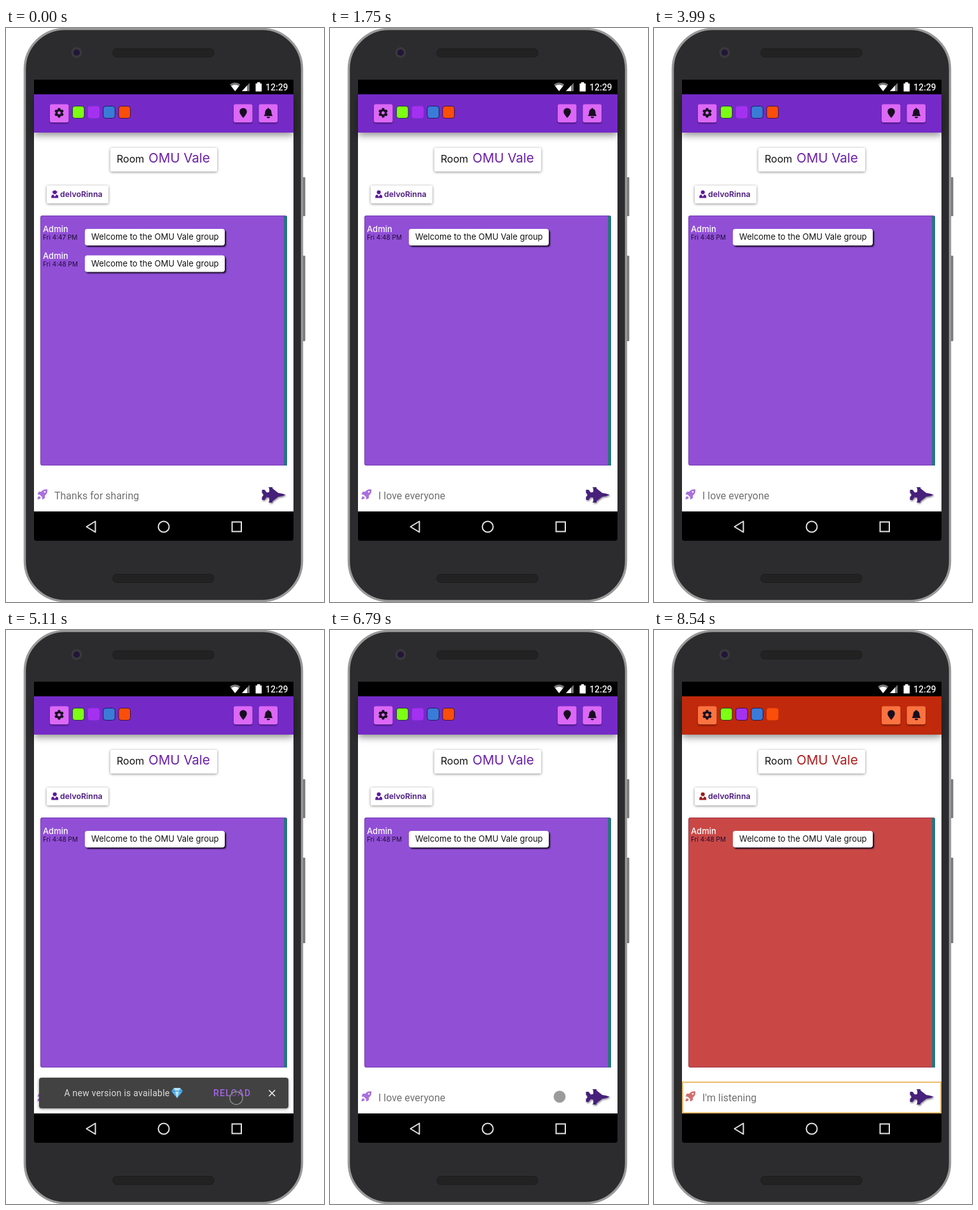
An HTML page that plays this animation: 500 by 900 pixels, repeating every 8.61 s.

```html
<!DOCTYPE html>
<html lang="en">
<head>
<meta charset="utf-8">
<title>Chat room on a phone</title>
<style>
  html, body { margin: 0; width: 100%; height: 100%; overflow: hidden; background: #fff; }
  svg { display: block; width: 500px; height: 900px; font-family: Inter, "Open Sans", sans-serif; }
  text { white-space: pre; }
  .ui { font-family: Roboto, "Noto Sans", sans-serif; }
  .lift { filter: drop-shadow(0 1px 2px rgba(0, 0, 0, .45)); }
  .bar { fill: var(--bar); filter: drop-shadow(0 4px 6px rgba(0, 0, 0, .45)); }
  .btn { fill: var(--btn); filter: drop-shadow(0 2px 1px rgba(0, 0, 0, .35)); }
  .body { fill: var(--body); }
  .bubble { fill: var(--body); filter: drop-shadow(2px 2px 1.2px #12081c); }
  .panel { fill: var(--panel); }
  .glyph { fill: #160d20; }
</style>
</head>
<body>
<svg id="stage" viewBox="0 0 500 900" xmlns="http://www.w3.org/2000/svg"></svg>
<script>
const LOOP = 8610, STEP = 70;
const GROUP = 'OMU Vale', USER = 'delvoRinna';

const themes = {
  purple: { bar: '#752ac8', btn: '#dc68f5', body: '#ffffff', panel: '#914fd6', name: '#6b1fa8', icon: '#5b1a99',
    rocket: '#a970de', sw0: '#7dff14', sw1: '#a431f0', sw2: '#3b7bd8', sw3: '#fa4e0a' },
  red: { bar: '#c0290b', btn: '#fa7340', body: '#ffffff', panel: '#c94846', name: '#b01c1c', icon: '#9c1c1c',
    rocket: '#d17070', sw0: '#7dff14', sw1: '#a431f0', sw2: '#3b7bd8', sw3: '#fa4e0a' },
  loading: { bar: '#918db6', btn: '#55dbf5', body: '#e7d9fc', panel: '#e7d9fc', name: '#6b1fa8', icon: '#1a1030',
    rocket: '#a96fe0', sw0: '#7fd84a', sw1: '#a42fe8', sw2: '#4070d0', sw3: '#db4545' }
};

const rect = (x, y, w, h, r, attrs = '') =>
  `<rect x="${x}" y="${y}" width="${w}" height="${h}" rx="${r}" ${attrs}/>`;
const label = (x, y, size, str, attrs = '') =>
  `<text x="${x}" y="${y}" font-size="${size}" ${attrs}>${str}</text>`;

const gear = () => {
  let teeth = '';
  for (let i = 0; i < 6; i++) teeth += rect(-2, -7.4, 4, 4, 1, `transform="rotate(${i * 60})"`);
  return `<g class="glyph" transform="translate(83.5 133)">${teeth}
    <circle r="4.1" fill="none" stroke="#160d20" stroke-width="3.2"/></g>`;
};

const swatches = () => [0, 1, 2, 3].map(i =>
  rect(104.5 + i * 24.2, 122.5, 18.5, 19, 4, `id="swatch${i}" fill="var(--sw${i})" stroke-width="1"`)).join('');

const message = (id, dy, time) => `<g id="${id}" transform="translate(0 ${dy})">
  <g class="fontText">
    ${label(58, 320, 13, 'Admin', 'fill="#fff" font-weight="500"')}
    ${label(58, 332, 10, time, 'fill="#1d0d33"')}
  </g>
  <rect class="bubble" id="${id}Bubble" y="315" height="26" rx="4"/>
  ${label(134, 332, 13, `Welcome to the ${GROUP} group`, 'class="fontText" fill="#111"')}
</g>`;

const phone = () => `
  ${rect(464, 234, 6.5, 61, 1, 'fill="#777"')}
  ${rect(464, 357, 6.5, 134, 1, 'fill="#777"')}
  ${rect(29.5, 1.5, 436, 897, 63, 'fill="#2c2c2e" stroke="#999" stroke-width="3.5"')}
  ${[32.5, 856.5].map(y => rect(168, y, 159, 13, 6, 'fill="#222223" stroke="#1b1b1c"')).join('')}
  <circle cx="111" cy="38.5" r="8.5" fill="#39383c"/>
  <circle cx="111" cy="38.5" r="5" fill="#231538"/>`;

const systemBars = () => `
  ${rect(44, 81, 408, 23, 0)}
  <path d="M44 758H452V800Q452 804 448 804H48Q44 804 44 800Z"/>
  <path d="M352 88.5Q360 82.5 368.500 88.5L360.2 99Z" fill="#777"/>
  <path d="M354 91Q360 87 366.500 91L360.2 99Z" fill="#fff"/>
  <path d="M371 99L383 86V99Z" fill="#777"/><path d="M371 99L379 90.300V99Z" fill="#fff"/>
  <path d="M392.500 87H395V85H399.500V87H402V99.500H392.500Z" fill="#fff"/>
  ${label(408, 98, 14, '12:29', 'class="ui" fill="#eee" font-weight="500"')}
  <g fill="none" stroke="#e2e2e2" stroke-width="2">
    <path d="M126.500 782L140.500 773.500V790.500Z" stroke-linejoin="round"/>
    <circle cx="248" cy="782" r="8.500"/><path d="M355.500 774.500H370V789.500H355.500Z"/>
  </g>`;

const header = () => `
  ${rect(44, 104, 408, 60, 0, 'class="bar"')}
  ${[69, 358, 397.5].map(x => rect(x, 119.5, 29.5, 28.5, 3, 'class="btn"')).join('')}
  ${gear()}${swatches()}
  <path class="glyph" d="M373 141Q367.200 134.500 367.200 131.200A5.800 5.800 0 0 1 378.800 131.200Q378.800 134.500 373 141Z"/>
  <path class="glyph" d="M405.500 138Q407.500 136 407.500 131.500Q408 127.500 411.300 126.700V125.500H413.500V126.700Q417 127.500 417.300 131.500Q417.300 136 419.300 138ZM410 139H415A2.500 2.500 0 0 1 410 139Z"/>`;

const content = () => `<g id="content">
  <rect class="body lift" id="roomCard" y="188" height="37" rx="2"/>
  <g class="fontText">
    ${label(174, 211, 16, 'Room', 'fill="#111"')}
    ${label(224, 211, 20.5, GROUP, 'fill="var(--name)" font-weight="400"')}
  </g>
  <rect class="body lift" id="userCard" x="64" y="247" height="28" rx="2"/>
  <g fill="var(--icon)">
    <circle cx="76.700" cy="257.500" r="3.100"/>
    <path d="M71.300 266.500V264.500Q71.300 261.500 74.500 261.300L76.700 264.500L79 261.300Q82.200 261.500 82.200 264.500V266.500Z"/>
    <path id="hat" d="M72.500 256.500H81V257.700H72.500Z"/>
  </g>
  ${label(85, 265, 12.4, USER, 'class="fontText" fill="#4b1a80" font-weight="600"')}
  ${rect(54, 294, 388, 392, 3, 'class="panel"')}
  ${rect(54.5, 294.5, 387, 391, 3, 'id="panelEdge" fill="none" stroke="#3a1a60" stroke-opacity=".3"')}
  ${rect(437, 295, 5, 391, 0, 'fill="#2a7480"')}
  ${message('first', 0, '')}
  ${message('second', 41.5, 'Fri 4:48 PM')}
</g>
${rect(445.5, 108, 2.5, 187, 1, 'id="scrollbar" fill="#c8bcd8"')}`;

const inputRow = () => `
  ${rect(45, 709, 406, 48, 0, 'id="focus" fill="none" stroke="#efbd70" stroke-width="2"')}
  <path fill="var(--rocket)" d="M65 723.500Q59 722.500 55.500 727H51.500L49.500 731.500L53 731.800L56.800 735.500L57 739.500L61.200 737V733Q66 729.500 65 723.500ZM52 734Q49.500 735 49.500 739Q53.500 739 54.800 736.500Z"/>
  <circle cx="61" cy="727.300" r="1.300" fill="#fff"/>
  <text id="placeholder" class="ui" x="76" y="739" font-size="16" fill="#000" fill-opacity=".56"></text>
  <path d="M440 732Q434 729.300 428 729L419 722V720H412.500L414 722V727.500L410 728.500L406.500 724H402.500V729L404.500 730.500V733.500L402.500 735V740H406.500L410 735.500L414 736.500V742L412.500 744H419V742L428 735Q434 734.700 440 732Z"
    fill="#46207a" style="filter:drop-shadow(1.5px 2px 1px rgba(70,60,80,.55))"/>`;

const toast = () => `<g id="toast">
  ${rect(52, 702, 392, 48, 4, 'class="lift" fill="#424242"')}
  ${label(91.5, 731, 14, 'A new version is available', 'class="ui" fill="#dcdcdc" letter-spacing=".25"')}
  <path d="M260 723L264 718H274L278 723L269 734Z" fill="#58b5ee"/>
  <path d="M264 718L266 723H272L274 718ZM266 723L269 734L272 723Z" fill="#b7e4fb"/>
  <path d="M260 723H278" stroke="#2677bd"/>
  ${label(326, 731, 14, 'RELOAD', 'class="ui" fill="#a464e6" font-weight="500" letter-spacing="1.25"')}
  <path d="M413.500 721.500L423 731M423 721.500L413.500 731" stroke="#eee" stroke-width="1.600"/>
</g>`;

const stage = document.getElementById('stage');
stage.innerHTML = phone() + rect(44, 104, 408, 654, 0, 'class="body"') + content() + header() +
  inputRow() + toast() + systemBars() +
  '<circle id="touch" fill="#383838" fill-opacity=".5" stroke="#999" stroke-opacity=".8" stroke-width="1.500"/>';

const $ = id => document.getElementById(id);
const fontTexts = stage.querySelectorAll('.fontText');
const firstTime = $('first').querySelectorAll('text')[1];

const clamp = v => Math.min(1, Math.max(0, v));
const ramp = (t, from, to) => clamp((t - from) / (to - from));
const ease = k => k * k * (3 - 2 * k);
const lerp = (a, b, k) => a + (b - a) * k;
const show = (el, on) => el.setAttribute('visibility', on ? 'visible' : 'hidden');
const span = (id, x, width) => { $(id).setAttribute('x', x); $(id).setAttribute('width', width); };
const mix = (a, b, k) => {
  const channel = (c, i) => parseInt(c.slice(i, i + 2), 16);
  return `rgb(${[1, 3, 5].map(i => Math.round(lerp(channel(a, i), channel(b, i), k)))})`;
};

const RELOADS = [490, 5460], FONT_WAIT = 350, FADE = 280;
const TOAST_IN = 3990, TOAST_OUT = 5250, PICK = 7910;

function paintTheme(t) {
  const started = RELOADS.filter(s => t >= s).pop();
  const fade = started === undefined ? 1 : ease(ramp(t, started + FONT_WAIT, started + FONT_WAIT + FADE));
  const red = ease(ramp(t, PICK, PICK + 280));
  const [from, to, k] = red > 0 ? [themes.purple, themes.red, red] : [themes.loading, themes.purple, fade];
  for (const key in to) stage.style.setProperty('--' + key, mix(from[key], to[key], k));
  for (let i = 0; i < 4; i++) {
    const active = i === (t >= PICK ? 3 : 1) && fade === 1;
    $('swatch' + i).setAttribute('stroke', active ? 'none' : 'rgba(10,5,50,.7)');
  }
  $('panelEdge').setAttribute('opacity', fade);
  $('scrollbar').setAttribute('opacity', 1 - fade);
}

function paintLayout(t) {
  const waiting = RELOADS.some(s => t >= s && t < s + FONT_WAIT);
  const old = t < RELOADS[0];
  $('content').setAttribute('transform', `translate(0 ${waiting ? 1 : 0})`);
  span('roomCard', waiting ? 167 : 164, waiting ? 162 : 168);
  span('userCard', 64, waiting ? 93 : 97);
  for (const id of ['firstBubble', 'secondBubble']) span(id, waiting ? 119.5 : 124, waiting ? 195 : 220);
  $('first').setAttribute('transform', `translate(0 ${waiting ? 1 : 0})`);
  fontTexts.forEach(el => el.setAttribute('display', waiting ? 'none' : 'inline'));
  $('second').setAttribute('display', old ? 'inline' : 'none');
  firstTime.textContent = old ? 'Fri 4:47 PM' : 'Fri 4:48 PM';
  show($('hat'), old);
  $('placeholder').textContent = old ? 'Thanks for sharing' : t < PICK ? 'I love everyone' : "I'm listening";
  show($('focus'), t >= PICK + 70);
}

function paintOverlays(t) {
  const grow = ease(ramp(t, TOAST_IN, TOAST_IN + 150));
  const scale = lerp(.8, 1, grow);
  show($('toast'), t >= TOAST_IN && t < TOAST_OUT);
  $('toast').setAttribute('opacity', grow);
  $('toast').setAttribute('transform', `translate(248 726) scale(${scale}) translate(-248 -726)`);

  const arrive = ease(ramp(t, 4480, 4900)), release = ease(ramp(t, 5180, 5320)), leave = ease(ramp(t, 7000, 7770));
  const x = lerp(lerp(385, 362, arrive) - release, 186, leave);
  const y = lerp(lerp(755, 734, arrive) - 2.3 * release, 132, leave);
  $('touch').setAttribute('transform', `translate(${x} ${y})`);
  $('touch').setAttribute('r', lerp(10, 8.8, release));
  show($('touch'), t >= 4480 && t < 8120);
}

function render(now) {
  const t = Math.floor((now % LOOP) / STEP) * STEP;
  paintTheme(t);
  paintLayout(t);
  paintOverlays(t);
}

const start = performance.now();
function tick() {
  render(performance.now() - start);
  requestAnimationFrame(tick);
}
tick();
</script>
</body>
</html>
```
